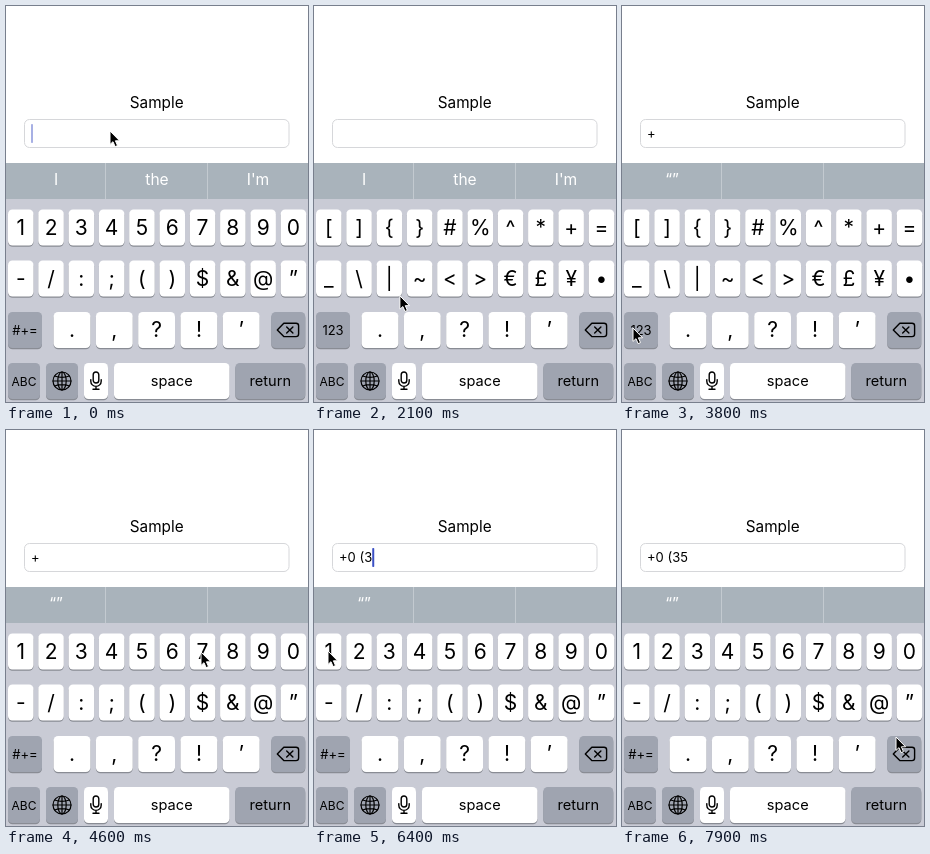
Write an HTML page that moves like this. It is 302 px wide and 396 px high and loops after 8000 ms.

```html
<!DOCTYPE html>
<html lang="en">
<head>
<meta charset="utf-8">
<title>Sample keyboard input</title>
<style>
  html, body { margin: 0; width: 100%; height: 100%; overflow: hidden; background: #fff; }
  svg { display: block; width: 100vw; height: 100vh; }
  text { font-family: Inter, "Liberation Sans", sans-serif; fill: #000; white-space: pre; }
  .mid { text-anchor: middle; }
  .hint { fill: #fff; font-size: 15.6px; }
  .icon { fill: none; stroke: #000; stroke-width: 1.2; stroke-linecap: round; stroke-linejoin: round; }
</style>
</head>
<body>
<svg viewBox="0 0 302 396">
  <text class="mid" x="150.7" y="101.5" font-size="15.3">Sample</text>
  <rect x="18.5" y="113.5" width="264.5" height="28" rx="5" fill="#fff" stroke="#d6d7da"/>
  <text id="field" x="25" y="132.2" font-size="13"></text>
  <rect id="caret" y="118" width="2" height="19" rx=".8" fill="#3c50c4"/>

  <rect y="157" width="302" height="36" fill="#a9b3bb"/>
  <path d="M99.5 157V193M201.5 157V193" stroke="#c3cad0"/>
  <g id="hints"></g>
  <rect y="193" width="302" height="203" fill="#c9cbd5"/>
  <g id="keys"></g>

  <g class="icon">
    <g transform="translate(56 375)">
      <circle r="9"/>
      <ellipse rx="4.2" ry="9"/>
      <path d="M-9 0H9M0-9V9M-7.4-5Q0-2.2 7.4-5M-7.4 5Q0 2.2 7.4 5"/>
    </g>
    <g transform="translate(90 374.6)" stroke-width="1.4">
      <rect x="-2.8" y="-8.6" width="5.6" height="11" rx="2.8"/>
      <path d="M-5.2-1V.6A5.2 5.2 0 0 0 5.2 .6V-1M0 6V8.6M-3 8.6H3"/>
    </g>
    <path stroke-width="1.4" d="M277.8 317.2H290Q292.6 317.2 292.6 319.8V328Q292.6 330.6 290 330.6H277.8L271.3 324ZM280.7 320.9L286.9 327.1M286.9 320.9L280.7 327.1"/>
  </g>

  <path id="pointer" d="M0 0V13.4L3 10.7L5.1 15.6L7.5 14.6L5.4 9.8H9.6Z" fill="#000" stroke="#fff"/>
</svg>
<script>
const LOOP = 8000, STEP = 100, REST = 300;
const $ = id => document.getElementById(id);
const clamp = v => Math.min(1, Math.max(0, v));

function add(parent, tag, attrs, label = '') {
  const el = document.createElementNS('http://www.w3.org/2000/svg', tag);
  for (const k in attrs) el.setAttribute(k, attrs[k]);
  el.textContent = label;
  return parent.appendChild(el);
}

function key(x, y, width, { label, size = 21, base = 25, dark = false } = {}) {
  const box = { x, width, height: 36, rx: 4.5 };
  add($('keys'), 'rect', { ...box, y: y + 1.2, fill: '#898c94' });
  add($('keys'), 'rect', { ...box, y, fill: dark ? '#9fa4b0' : '#fff' });
  return add($('keys'), 'text', { class: 'mid', x: x + width / 2, y: y + base, 'font-size': size }, label);
}

// Two pages of the upper rows
const pages = ['1234567890-/:;()$&@”', '[]{}#%^*+=_\\|~<>€£¥•'];
const caps = [...pages[0]].map((c, i) => key(2 + 30.3 * (i % 10), i < 10 ? 203.5 : 254.5, 25.5));

const modeKey = key(2, 306, 34, { size: 13, base: 22.7, dark: true });
[...'.,?!’'].forEach((label, i) => key(47.6 + 42.3 * i, 306, 36.8, { label }));
key(265.3, 306, 34, { dark: true });

const small = { size: 14.6, base: 22.8 };
key(2, 357, 32, { ...small, label: 'ABC', size: 12, dark: true });
key(40, 357, 32, { dark: true });
key(78, 357, 24);
key(108, 357, 115.5, { ...small, label: 'space' });
key(229.3, 357, 70, { ...small, label: 'return', dark: true });

const hints = [50, 151, 252].map(x => add($('hints'), 'text', { class: 'mid hint', x, y: 179 }));

// The pointer reaches each stop REST ms before `at`, presses and leaves at `at`.
const stops = [
  { at: 0, x: 104, y: 125, text: '', page: 0 },
  { at: 500, x: 202, y: 378 },
  { at: 1800, x: 26, y: 315, page: 1 },
  { at: 3000, x: 257, y: 218, text: '+' },
  { at: 3500, x: 257, y: 218 },
  { at: 4100, x: 11, y: 322, page: 0 },
  { at: 4700, x: 195, y: 222, text: '+0' },
  { at: 5200, x: 182, y: 352 },
  { at: 5700, x: 169, y: 387 },
  { at: 6400, x: 14, y: 221, text: '+0 (3' },
  { at: 6700, x: 14, y: 221 },
  { at: 7200, x: 41, y: 218, text: '+0 (35' },
  { at: 7800, x: 90, y: 238 },
  { at: LOOP + 200, x: 274, y: 307 }
];

const last = (t, prop) => stops.findLast(s => s.at <= t && prop in s);

function pointerAt(t) {
  const i = stops.findIndex(s => s.at > t);
  const a = stops[i - 1], b = stops[i];
  const u = clamp((t - a.at) / Math.max(1, b.at - REST - a.at));
  const e = u * u * (3 - 2 * u);
  return [a.x + (b.x - a.x) * e, a.y + (b.y - a.y) * e];
}

// Solid after a key press, then a 900 ms cycle of fading in and out
function caretOpacity(age) {
  const p = (age + 700) % 900;
  return age < 300 ? 1 : Math.min(clamp(p / 100), clamp((500 - p) / 200));
}

function hintWords(text, age) {
  if (!text) return ['I', 'the', "I'm"];
  return [text === '+' && age < 200 ? '' : '“”', '', ''];
}

function draw(t) {
  const { page } = last(t, 'page');
  const { at, text } = last(t, 'text');
  caps.forEach((el, i) => el.textContent = pages[page][i]);
  modeKey.textContent = page ? '123' : '#+=';
  hintWords(text, t - at).forEach((w, i) => hints[i].textContent = w);

  $('field').textContent = text;
  $('caret').setAttribute('x', 25 + (text && $('field').getComputedTextLength()));
  $('caret').setAttribute('opacity', caretOpacity(text ? t - at : t + 610));
  $('pointer').setAttribute('transform', `translate(${pointerAt(t)})`);
}

const start = performance.now();
let shown = -1;
function tick(now) {
  const t = Math.floor(Math.max(0, now - start) % LOOP / STEP) * STEP;
  if (t !== shown) draw(shown = t);
  requestAnimationFrame(tick);
}
tick(start);
</script>
</body>
</html>
```
